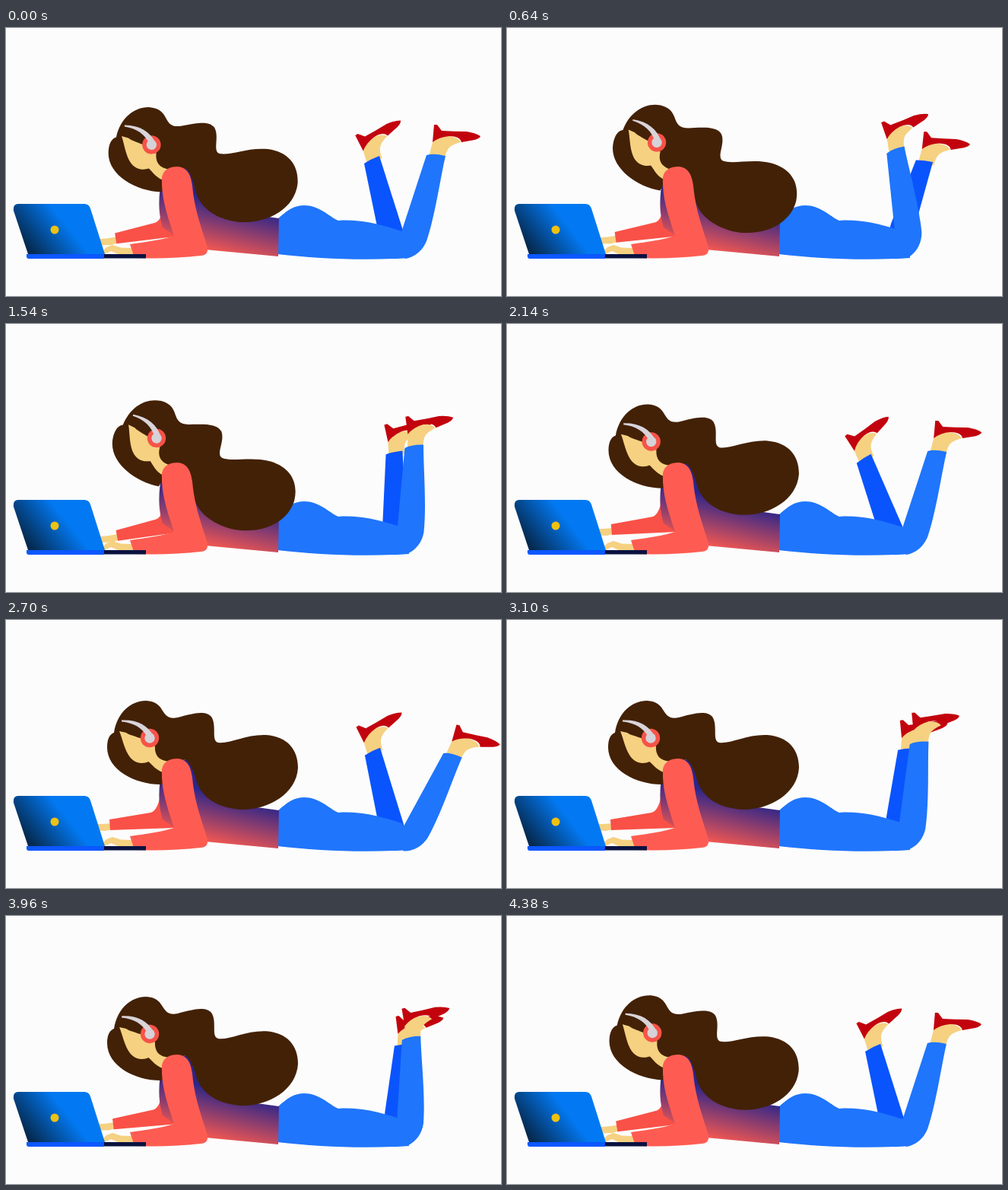
Recreate the animation shown at these times as an HTML page. Size 651 by 352 pixels, loop 4.4 s.

```html
<!DOCTYPE html>
<html lang="en">
<head>
<meta charset="utf-8">
<title>Lounging with a laptop</title>
<style>
  html, body { margin: 0; width: 100%; height: 100%; overflow: hidden; background: #fcfcfc; }
  svg { display: block; width: 651px; height: 352px; }
  .skin { fill: #f5d181; }
  .shoe { fill: #c2030e; }
  .hair { fill: #432106; }
  .jeans { fill: #1f75fc; }
  .sleeve { fill: #fe5c52; }
</style>
</head>
<body>
<svg viewBox="0 0 651 352">
  <defs>
    <linearGradient id="top" gradientUnits="userSpaceOnUse" x1="280" y1="227" x2="264" y2="294">
      <stop offset="0" stop-color="#29258a"/>
      <stop offset="1" stop-color="#fb594f"/>
    </linearGradient>
    <linearGradient id="lid" gradientUnits="userSpaceOnUse" x1="24" y1="282" x2="70" y2="246">
      <stop offset="0" stop-color="#052a50"/>
      <stop offset="1" stop-color="#0279f2"/>
    </linearGradient>
    <g id="foot">
      <path class="skin" d="M561 150C569 140 592 139 598 150Q587 153 583 157Q579 161 577 171L556 169Q559 158 561 150Z"/>
      <path class="shoe" d="M563 127H567L573 135Q590 136 606 136Q618 138 624 142Q623 145 616 147L599 150Q597 142 583 142Q570 143 561 150Z"/>
    </g>
  </defs>

  <g id="farLeg">
    <use href="#foot" transform="translate(461 140) rotate(-32) translate(-565 -127)"/>
    <path fill="#0a54fd" d="M471 178Q480 172 491 168L524 272L520 290L495 285L489 265Z"/>
  </g>
  <path class="jeans" d="M357 251C370 239 379 233 392 233C412 233 424 247 437 253C465 251 490 257 521 267L530 285V302C470 306 410 303 357 297Z"/>
  <g id="nearLeg">
    <use href="#foot"/>
    <path class="jeans" d="M553 167Q562 164 578 168C571 198 565 244 553 280C548 292 538 301 525 303L515 290L520 268Z"/>
  </g>

  <g id="farArm">
    <path class="skin" d="M140 267L126 268H112V276L130 277L140 275Z"/>
    <path fill="#f95147" d="M136 262L190 253Q198 251 202 235L214 245L222 273L137 276Z"/>
  </g>
  <path fill="url(#top)" d="M205 196C201 218 199 240 206 262L222 273L262 291L358 300L359 250L330 246L264 200L238 182Z"/>

  <g id="head">
    <path class="hair" d="M142 148C146 122 164 106 184 106C212 107 201 133 226 128C245 123 262 118 270 127C278 139 269 158 279 161C294 163 315 150 342 151C370 153 384 170 384 194C382 228 346 249 311 249C274 247 256 230 250 210C246 196 242 188 236 183L215 190L206 216C172 217 133 198 133 167C133 157 136 150 142 148Z"/>
    <path class="skin" d="M186 185C192 189 198 200 212 201L216 186C201 185 195 178 196 164Z"/>
    <path class="skin" d="M149 146C155 160 158 187 178 188C186 188 190 185 195 181V162C180 155 163 152 158 148Z"/>
    <circle cx="189" cy="155" r="12.2" fill="#f75348"/>
    <path fill="#d8d4da" d="M152 131.500C172 130.500 186 138 194 152L186 154C180 142 168 135 152 133.500Z"/>
    <circle cx="189" cy="155" r="6.700" fill="#d5d2d8"/>
  </g>

  <path class="skin" d="M168 297L165 289L151 288.500L140 285L132 288L126 294L129 297L138 293L147 297Z"/>
  <path class="sleeve" d="M205 196C207 186 215 182 226 182C238 183 243 192 245 207C248 240 258 265 265 288C266 296 262 299 256 299C230 302 200 303 169 302L163 284C185 281 205 278 221 273C212 245 204 225 205 196Z"/>

  <path fill="url(#lid)" d="M16 231H103Q109 231 111 237L130 297H29L10 240Q9 231 16 231Z"/>
  <circle cx="64" cy="265" r="5.500" fill="#edc211"/>
  <path fill="#0b57ff" d="M27 297H129V303H30Q27 303 27 300Z"/>
  <path fill="#0a1240" d="M129 297H184V302.500H129Z"/>
</svg>

<script>
  const LOOP = 4400;

  // Both legs turn around on the same beats, counted in fifths of the loop.
  const BEATS = [0, 1, 2.4, 3, 4, 5];
  const NEAR = [0, -29, 0, 11, -29, 0];
  const FAR = [0, 40, -6, 0, 40, 0];

  const [nearLeg, farLeg, head, farArm] =
    ['nearLeg', 'farLeg', 'head', 'farArm'].map(id => document.getElementById(id));

  const ease = p => (1 - Math.cos(Math.PI * Math.min(1, Math.max(0, p)))) / 2;

  function swing(poses, t) {
    const beat = t / LOOP * 5;
    const i = BEATS.findIndex(b => b > beat);
    const p = (beat - BEATS[i - 1]) / (BEATS[i] - BEATS[i - 1]);
    return poses[i - 1] + (poses[i] - poses[i - 1]) * ease(p);
  }

  // Goes from 0 to 1 at "up" and back at "down", across the seam of the loop.
  function lift(t, up, rise, down, fall) {
    const since = at => (t - at + LOOP) % LOOP;
    const span = (down - up + LOOP) % LOOP;
    const u = since(up);
    return ease(u / rise) - ease((u - span) / fall);
  }

  const turn = (deg, x, y) => `rotate(${deg} ${x} ${y})`;
  const place = (el, transform) => el.setAttribute('transform', transform);

  function draw(t) {
    const typing = .85 - .18 * Math.sin(4 * Math.PI * t / LOOP);
    const reach = typing * lift(t, 3560, 820, 1580, 720);
    place(nearLeg, turn(swing(NEAR, t), 521, 292));
    place(farLeg, turn(swing(FAR, t), 512, 288));
    place(head, turn(13 * lift(t, 3885, 1455, 1600, 667), 215.5, 192));
    place(farArm, `translate(${9 * reach} 0) ${turn(-5.8 * reach, 222, 272)}`);
  }

  const start = performance.now();
  function frame() {
    draw((performance.now() - start) % LOOP);
    requestAnimationFrame(frame);
  }
  frame();
</script>
</body>
</html>
```
